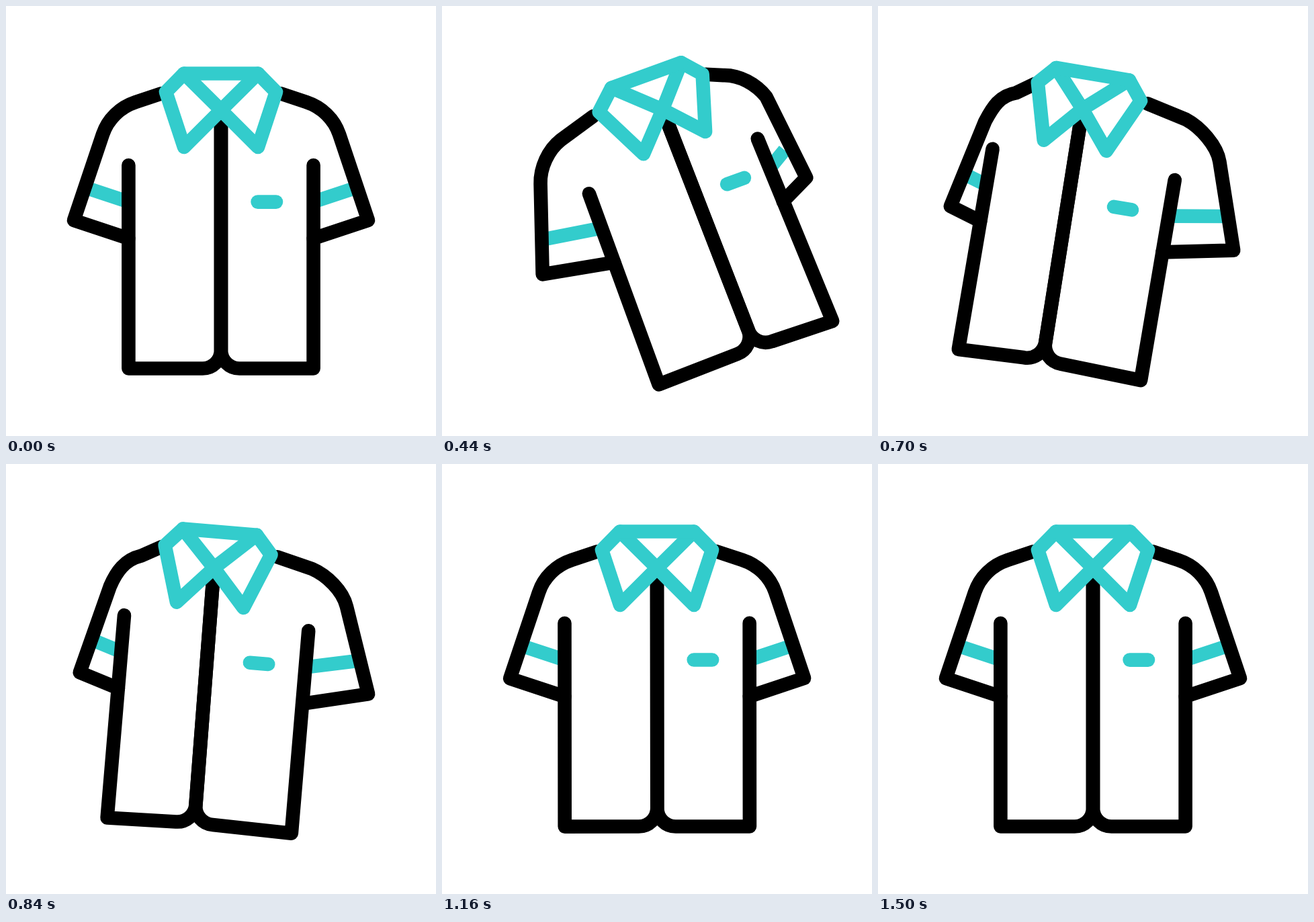
An HTML page with a canvas for the animation above (2.4 s loop, 640 by 640 pixels).

```html
<!DOCTYPE html>
<html lang="en">
<head>
<meta charset="utf-8">
<title>Swinging shirt</title>
<style>
  html, body { margin: 0; width: 100%; height: 100%; overflow: hidden; background: #fff; }
  canvas { display: block; width: 640px; height: 640px; }
</style>
</head>
<body>
<canvas id="stage" width="640" height="640"></canvas>
<script>
const ctx = document.getElementById('stage').getContext('2d');
const BLACK = '#000', TEAL = '#33cccc';
const LOOP = 2400, STEP = 20;
const PIVOT = [320, 155];

// Each point: rest x, y, then its offset at the left swing and at the right swing.
const collar = {
  topL: [265, 100.5, 2.7, 0, -9.8, 1.6],
  topR: [375, 100.5, 3.1, 0.4, -9.5, 1.4],
  sideL: [238, 128, 0, 0, -6, 0.2],
  sideR: [402, 128, 0, 0, -14.5, 1.5],
  tipL: [265, 210, 14, -0.6, -10, 1.5],
  tipR: [375, 210, 2, -0.2, -25.5, 1.5],
  knot: [320, 155, 8.3, 2.1, -16, 1]
};
const body = {
  armL: [182.4, 237],
  hemL: [182.4, 539.5],
  armR: [457.6, 237, -11.7, 9.4],
  hemR: [457.6, 539.5],
  pocketL: [374.6, 291.6, 5.5, 2.7],
  pocketR: [402, 291.6, 5.5, 2.7]
};
const hemSwing = [15.5, -2.5, -12, -4.2];
const hem = {
  seam: [320, 512, ...hemSwing],
  seamBend: [320, 527.2, ...hemSwing],
  outL: [292.5, 539.5, ...hemSwing],
  bendL: [307.7, 539.5, ...hemSwing],
  outR: [347.5, 539.5, ...hemSwing],
  bendR: [332.3, 539.5, ...hemSwing]
};
const sleeveL = {
  top: [193, 143, -23, 4.5, 10, 6],
  topBend: [170, 150.6, -23, 4.5, 10, 6],
  sideBend: [151.6, 168.1, -25, 7.5, 21, 7.5],
  side: [144, 191, -25, 7.5, 21, 7.5],
  cuff: [101, 319, -25.5, 7, 34.5, 12.7],
  end: [182.4, 346],
  bandOut: [117.4, 270, -25.3, 7.2, 29.4, 10.7],
  bandIn: [182.4, 291.5]
};
const sleeveR = {
  top: [447, 143, -17, -3, 12, 2.5],
  topBend: [470, 150.6, -17, -3, 12, 2.5],
  sideBend: [488.4, 168.1, -17, 1, 23, 8],
  side: [496, 191, -17, 1, 23, 8],
  cuff: [539, 319, -45.5, 6.5, 23, 6.5],
  end: [457.6, 346, -8, 1],
  bandOut: [522.6, 270, -45.5, 6, 23, 7],
  bandIn: [457.6, 291.5, -7, 0.6]
};

// time, angle in degrees, left swing weight, right swing weight
const keys = [
  [0, 0, 0, 0],
  [420, -20.4, 1, 0],
  [720, 10, 0, 1],
  [1020, -5, 0, 0],
  [1240, 2, 0, 0],
  [1500, 0, 0, 0]
];

function poseAt(time) {
  const next = keys.findIndex(key => key[0] > time);
  if (next < 0) return [0, 0, 0];
  const from = keys[next - 1], to = keys[next];
  const phase = (time - from[0]) / (to[0] - from[0]);
  const ease = (1 - Math.cos(Math.PI * phase)) / 2;
  return [1, 2, 3].map(i => from[i] + (to[i] - from[i]) * ease);
}

function draw(time) {
  const [angle, left, right] = poseAt(time);
  const place = ([x, y, lx = 0, ly = 0, rx = 0, ry = 0]) =>
    [x + lx * left + rx * right, y + ly * left + ry * right];
  const move = p => ctx.lineTo(...place(p));
  const curve = (a, b, c) => ctx.bezierCurveTo(...place(a), ...place(b), ...place(c));
  const stroke = (color, build, cap = 'round') => {
    ctx.strokeStyle = color;
    ctx.lineCap = cap;
    ctx.beginPath();
    build();
    ctx.stroke();
  };
  const line = (color, points, cap) => stroke(color, () => points.forEach(move), cap);

  ctx.setTransform(1, 0, 0, 1, 0, 0);
  ctx.fillStyle = '#fff';
  ctx.fillRect(0, 0, 640, 640);
  ctx.translate(...PIVOT);
  ctx.rotate(angle * Math.PI / 180);
  ctx.translate(-PIVOT[0], -PIVOT[1]);
  ctx.lineWidth = 20.6;
  ctx.lineJoin = 'round';

  const sleeve = (s, neck) => {
    line(TEAL, [s.bandOut, s.bandIn], 'butt');
    // Start a little past the collar corner so no dark rim shows around it.
    const start = neck.map((v, i) => v + ((s.top[i] || 0) - v) * 0.15);
    stroke(BLACK, () => {
      move(start);
      move(s.top);
      curve(s.topBend, s.sideBend, s.side);
      move(s.cuff);
      move(s.end);
    });
  };
  const panel = (arm, corner, out, bend) => stroke(BLACK, () => {
    move(arm);
    move(corner);
    move(out);
    curve(bend, hem.seamBend, hem.seam);
    move(collar.knot);
  });

  sleeve(sleeveL, collar.sideL);
  sleeve(sleeveR, collar.sideR);
  panel(body.armL, body.hemL, hem.outL, hem.bendL);
  panel(body.armR, body.hemR, hem.outR, hem.bendR);
  line(TEAL, [body.pocketL, body.pocketR]);

  const { topL, topR, sideL, sideR, tipL, tipR, knot } = collar;
  line(TEAL, [knot, topL, sideL, tipL, knot, tipR, sideR, topR, knot]);
  line(TEAL, [topL, topR]);
}

const begin = performance.now();
function frame() {
  const time = (performance.now() - begin) % LOOP;
  draw(Math.floor(time / STEP) * STEP);
  requestAnimationFrame(frame);
}
frame();
</script>
</body>
</html>
```
